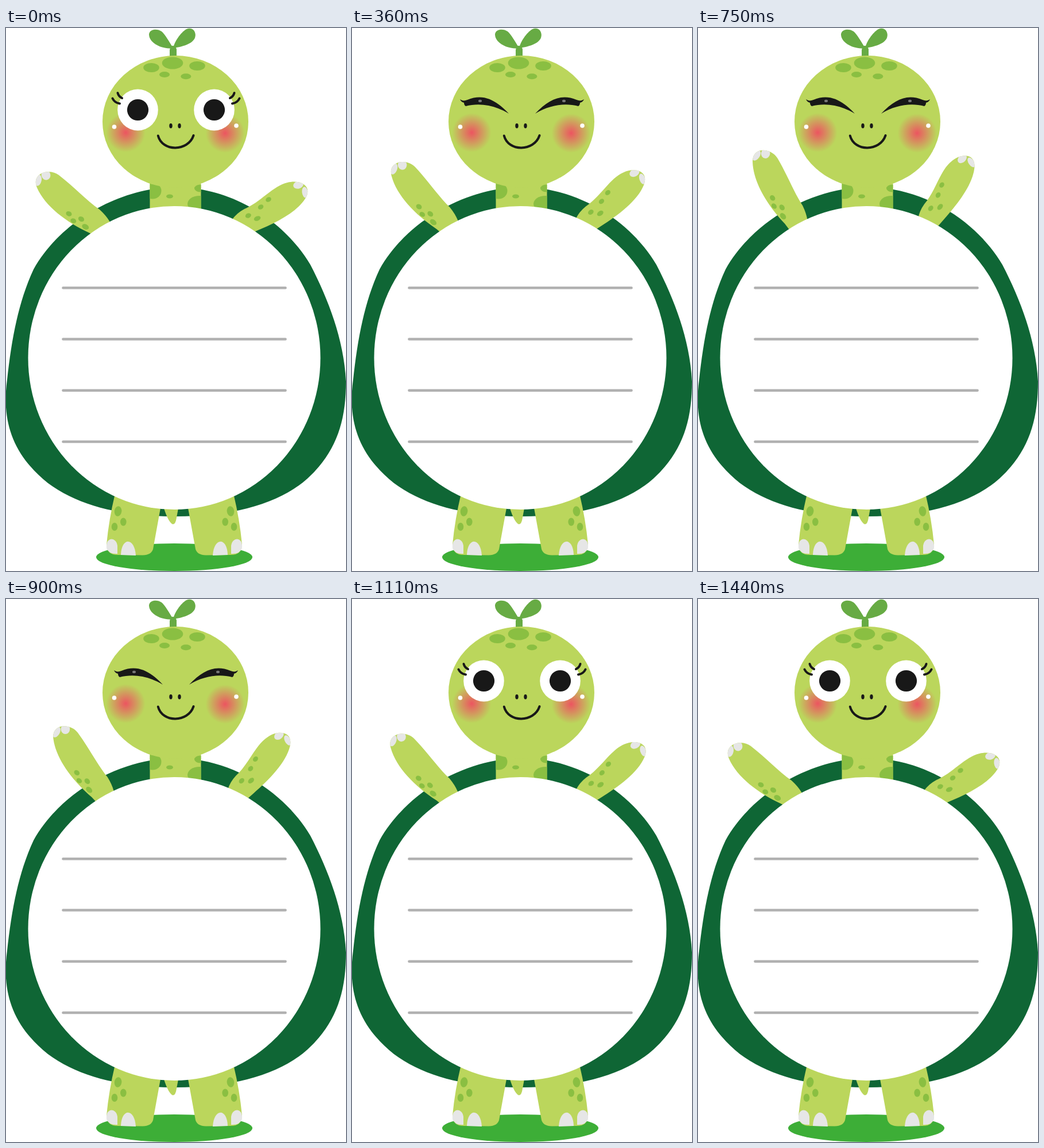
An HTML page for the animation above (1470 ms loop, 592 by 945 pixels).

```html
<!DOCTYPE html>
<html lang="en">
<head>
<meta charset="utf-8">
<title>Waving turtle</title>
<style>
  html, body { margin: 0; width: 100%; height: 100%; overflow: hidden; background: #fff; }
  svg { display: block; width: 592px; height: 945px; }
  .skin { fill: #bbd65c; }
  .spot { fill: #8abf42; }
  .leaf { fill: #67ab44; }
  .claw { fill: #e6e6e6; }
  .ink { fill: #181818; }
  .line { fill: none; stroke: #181818; stroke-width: 4; stroke-linecap: round; }
  .rule { stroke: #b1b1b1; stroke-width: 4.6; stroke-linecap: round; }
</style>
</head>
<body>
<svg viewBox="0 0 592 945">
  <defs>
    <radialGradient id="blush">
      <stop offset="0" stop-color="#ec5560"/>
      <stop offset="1" stop-color="#ec5560" stop-opacity="0"/>
    </radialGradient>
    <path id="armL" d="M166 369L146 357C105 338 68 310 54 278C43 253 75 243 92 256C118 276 140 300 163 316Q174 326 180 336L200 370Z"/>
    <path id="armR" d="M405 366L434 354C468 340 505 322 521 297C535 275 512 263 490 269C466 274 442 304 415 315Q402 322 394 333L380 352Z"/>
    <clipPath id="clipL"><use href="#armL"/></clipPath>
    <clipPath id="clipR"><use href="#armR"/></clipPath>
    <clipPath id="neck"><rect x="250.5" y="262" width="89" height="60"/></clipPath>
    <g id="leg">
      <path class="skin" d="M190 810Q179 856 175 899Q175 917 195 917L238 917.5Q253 917 256 907L270 830Z"/>
      <g class="spot">
        <ellipse cx="195" cy="841" rx="6.3" ry="8.8" transform="rotate(8 195 841)"/>
        <ellipse cx="204.3" cy="859.5" rx="5.3" ry="7"/>
        <ellipse cx="189" cy="868" rx="5.3" ry="7"/>
      </g>
      <path class="claw" d="M175 905C173 885 192 885 194 901V915Q179 916 175 905Z"/>
      <path class="claw" d="M200 917C201 886 224 886 226 918Z"/>
    </g>
    <g id="eye">
      <ellipse cx="229.5" cy="142.5" rx="35.3" ry="36" fill="#fff"/>
      <circle class="ink" cx="229.5" cy="142.5" r="18.6"/>
      <path class="line" d="M185.5 122.5Q189 130 198 131.5M194.5 113Q196 119 202 122"/>
    </g>
    <g id="wink">
      <path class="ink" d="M188 124C192 127 196 127 201 125C228 114 249 124 273 149C248 134 222 130 198 136Q195 134 195 130Q190 129 188 124Z"/>
      <ellipse cx="223" cy="127" rx="3" ry="2.2" fill="#777"/>
    </g>
  </defs>

  <ellipse cx="293" cy="921" rx="136" ry="24" fill="#3dae37"/>
  <path fill="#0f6635" d="M295 277C205 277 98 331 48 420C20 480 9 548 2 612C-8 685 12 743 73 792C125 831 200 850 295 850C400 850 478 826 525 784C575 738 592 685 592 615C588 540 560 470 530 412C486 337 395 277 295 277Z"/>
  <path class="skin" d="M275 836Q282 858 289 863Q295 866 297 852L300 836Z"/>
  <use href="#leg"/>
  <use href="#leg" transform="translate(586 0) scale(-1 1)"/>

  <g clip-path="url(#neck)">
    <rect class="skin" x="250" y="262" width="90" height="60"/>
    <g class="spot">
      <ellipse cx="255" cy="283.5" rx="15.5" ry="14"/>
      <ellipse cx="285" cy="293" rx="6" ry="3.5"/>
      <ellipse cx="338" cy="279" rx="10" ry="6.5"/>
      <ellipse cx="337" cy="306" rx="21" ry="14"/>
    </g>
  </g>

  <g id="left">
    <use class="skin" href="#armL"/>
    <g class="claw" clip-path="url(#clipL)">
      <ellipse cx="56" cy="265" rx="5.8" ry="10" transform="rotate(12 56 265)"/>
      <ellipse cx="69.5" cy="256" rx="7.8" ry="8.5" transform="rotate(-15 69.5 256)"/>
    </g>
    <g class="spot">
      <ellipse cx="109.5" cy="323.3" rx="5.2" ry="4.2" transform="rotate(25 109.5 323.3)"/>
      <ellipse cx="117.3" cy="335.5" rx="5.2" ry="4" transform="rotate(25 117.3 335.5)"/>
      <ellipse cx="131" cy="332.5" rx="5.4" ry="4.2" transform="rotate(30 131 332.5)"/>
      <ellipse cx="138.3" cy="346" rx="6.3" ry="4.4" transform="rotate(28 138.3 346)"/>
    </g>
  </g>
  <g id="right">
    <use class="skin" href="#armR"/>
    <g class="claw" clip-path="url(#clipR)">
      <ellipse cx="520.5" cy="286" rx="5" ry="9.5" transform="rotate(-8 520.5 286)"/>
      <ellipse cx="509" cy="273" rx="9" ry="6.5" transform="rotate(-18 509 273)"/>
    </g>
    <g class="spot">
      <ellipse cx="457" cy="298.5" rx="5" ry="4" transform="rotate(-30 457 298.5)"/>
      <ellipse cx="443.5" cy="311.5" rx="5" ry="4" transform="rotate(-30 443.5 311.5)"/>
      <ellipse cx="421.8" cy="326.5" rx="5.2" ry="4" transform="rotate(-25 421.8 326.5)"/>
      <ellipse cx="437.5" cy="331.5" rx="6" ry="4" transform="rotate(-22 437.5 331.5)"/>
    </g>
  </g>

  <ellipse cx="293" cy="574" rx="254.5" ry="264" fill="#fff"/>
  <path class="rule" d="M99.5 452.2H486.5M99.5 541.5H486.5M99.5 630.8H486.5M99.5 720H486.5"/>

  <g class="leaf">
    <path d="M285 50V38L287 31H295L297 37V50Z"/>
    <path d="M291 35C275 38 250 28 249 12C249 2 263 0 271 6C277 11 285 25 291 35Z"/>
    <path d="M291 35C293 24 304 8 314 2C326 -3 332 8 329 17C325 28 305 33 291 35Z"/>
  </g>
  <ellipse class="skin" cx="295" cy="163" rx="127" ry="115"/>
  <g class="spot">
    <ellipse cx="253" cy="69" rx="13.8" ry="8"/>
    <ellipse cx="290" cy="61" rx="18.3" ry="10.5"/>
    <ellipse cx="333" cy="66" rx="13.8" ry="8"/>
    <ellipse cx="276" cy="81" rx="9" ry="5"/>
    <ellipse cx="313.3" cy="84.3" rx="9" ry="5"/>
  </g>
  <circle cx="208.5" cy="182" r="34" fill="url(#blush)"/>
  <circle cx="381.5" cy="183" r="34" fill="url(#blush)"/>
  <g id="open">
    <use href="#eye"/>
    <use href="#eye" transform="translate(592 0) scale(-1 1)"/>
  </g>
  <g id="shut">
    <use href="#wink"/>
    <use href="#wink" transform="translate(592 0) scale(-1 1)"/>
  </g>
  <circle cx="188.5" cy="172" r="3.8" fill="#fff"/>
  <circle cx="401" cy="170" r="3.8" fill="#fff"/>
  <ellipse class="ink" cx="287" cy="170.3" rx="2.7" ry="4.2"/>
  <ellipse class="ink" cx="302" cy="170.3" rx="2.7" ry="4.2"/>
  <path class="line" d="M264.8 187.5C272 215.5 317 215.5 326.5 187"/>
</svg>
<script>
  const LOOP = 1470, STEP = 30, PEAK = 720, BLINK = 360;
  const $ = id => document.getElementById(id);
  const [left, right, open, shut] = ["left", "right", "open", "shut"].map($);

  // Arms rise slowly up to the blink, then faster up to the peak.
  const lift = (t, mid, top) =>
    t < BLINK ? mid * t / BLINK : mid + (top - mid) * (t - BLINK) / (PEAK - BLINK);

  function draw(now) {
    const t = Math.floor(now % LOOP / STEP) * STEP;
    const rise = PEAK - Math.abs(t - PEAK);
    const closed = t >= BLINK && t < 2 * PEAK - BLINK;
    left.setAttribute("transform", `rotate(${lift(rise, 9, 23)} 191 362)`);
    right.setAttribute("transform", `rotate(${-lift(rise, 10.5, 27.5)} 386 356)`);
    open.style.display = closed ? "none" : "";
    shut.style.display = closed ? "" : "none";
  }

  const start = performance.now();
  function tick() {
    draw(performance.now() - start);
    requestAnimationFrame(tick);
  }
  tick();
</script>
</body>
</html>
```
